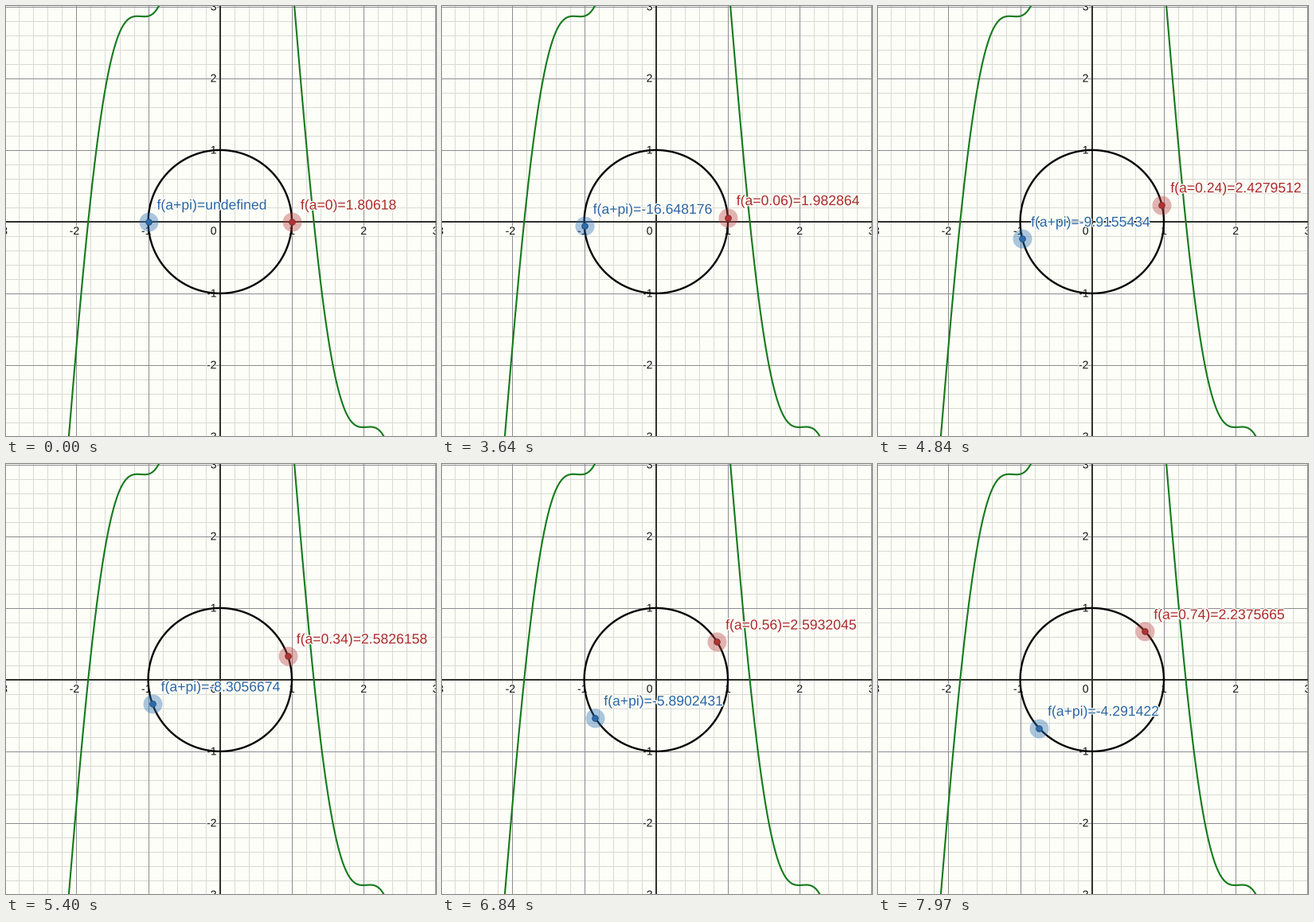
Recreate the animation shown at these times as a matplotlib script. Size 540x540 px, loop 8000 ms.

```python
import matplotlib.pyplot as plt
import matplotlib.patheffects as pe
import numpy as np
from matplotlib.animation import FuncAnimation

SIZE, DPI = 540, 100
PX = 72 / DPI                      # one pixel in points
X0, Y0, UX, UY = 268.8, 270.9, 90.2, 90.0
FRAMES, INTERVAL = 250, 32
START, TICK, STEP = 3185, 127, 0.02
PAPER = "#fefef8"

plt.rcParams["font.family"] = "Liberation Sans"
plt.rcParams["toolbar"] = "None"


def sx(x):
    return X0 + UX * x


def sy(y):
    return Y0 - UY * y


def f(a):
    return 6 * np.log10(1 + np.cos(a)) + np.sin(3 * a)


def halo(width):
    return [pe.withStroke(linewidth=width * PX, foreground=PAPER)]


fig = plt.figure(figsize=(SIZE / DPI, SIZE / DPI), dpi=DPI)
ax = fig.add_axes([0, 0, 1, 1])
ax.set_xlim(0, SIZE)
ax.set_ylim(SIZE, 0)
ax.axis("off")
fig.patch.set_facecolor(PAPER)


def draw_grid():
    minor = dict(color="#dadad4", lw=PX, zorder=1)
    major = dict(color="#8c8c92", lw=PX, zorder=2)
    axis = dict(color="#30302c", lw=2 * PX, zorder=3)
    for k in range(-15, 16):
        style = minor if k % 5 else major if k else axis
        ax.axvline(sx(k / 5), **style)
        ax.axhline(sy(k / 5), **style)


def draw_numbers():
    style = dict(size=14 * PX, color="#101010", va="baseline", zorder=4,
                 path_effects=halo(2), clip_on=True)
    for n in range(-3, 4):
        if n:
            ax.text(sx(n) - (2.5 if n < 0 else 0), 287, str(n),
                    ha="center", **style)
            ax.text(264.5, sy(n) + 4.5, str(n), ha="right", **style)
    ax.text(264.5, 287, "0", ha="right", **style)


def draw_curves():
    x = np.linspace(-3, 3, 1500)
    ax.plot(sx(x), sy(f(x) - f(x + np.pi)), color="#157a1c", lw=2.1 * PX,
            zorder=5)
    t = np.linspace(0, 2 * np.pi, 400)
    ax.plot(sx(np.cos(t)), sy(np.sin(t)), color="#050505", lw=2.4 * PX,
            zorder=6)


class Marker:
    def __init__(self, glow, core, edge, ink):
        self.glow, = ax.plot([], [], "o", ms=24 * PX, color=glow, alpha=0.4,
                             mew=0, zorder=7)
        self.dot, = ax.plot([], [], "o", ms=7.5 * PX, mfc=core, mec=edge,
                            mew=PX, zorder=8)
        self.label = ax.text(0, 0, "", size=17.6 * PX, color=ink,
                             va="baseline", zorder=9, path_effects=halo(2.6))

    def place(self, angle, text):
        x, y = sx(np.cos(angle)), sy(np.sin(angle))
        for part in (self.glow, self.dot):
            part.set_data([x], [y])
        self.label.set_position((x + 10.9, y - 15.4))
        self.label.set_text(text)


draw_grid()
draw_numbers()
draw_curves()
far = Marker("#2d70b3", "#2d6cab", "#214f80", "#2a66a6")
near = Marker("#b84444", "#b23232", "#842828", "#ac2a2a")


def update(i):
    n = max(0, int((i * INTERVAL - START) // TICK))
    a = round(n * STEP, 2)
    opposite = f"{f(a + np.pi):.8g}" if n else "undefined"
    near.place(a, f"f(a={a:g})={f(a):.8g}")
    far.place(a + np.pi, f"f(a+pi)={opposite}")
    return ()


anim = FuncAnimation(fig, update, frames=FRAMES, interval=INTERVAL,
                     init_func=lambda: update(0), repeat=True, repeat_delay=0)
plt.show()
```
